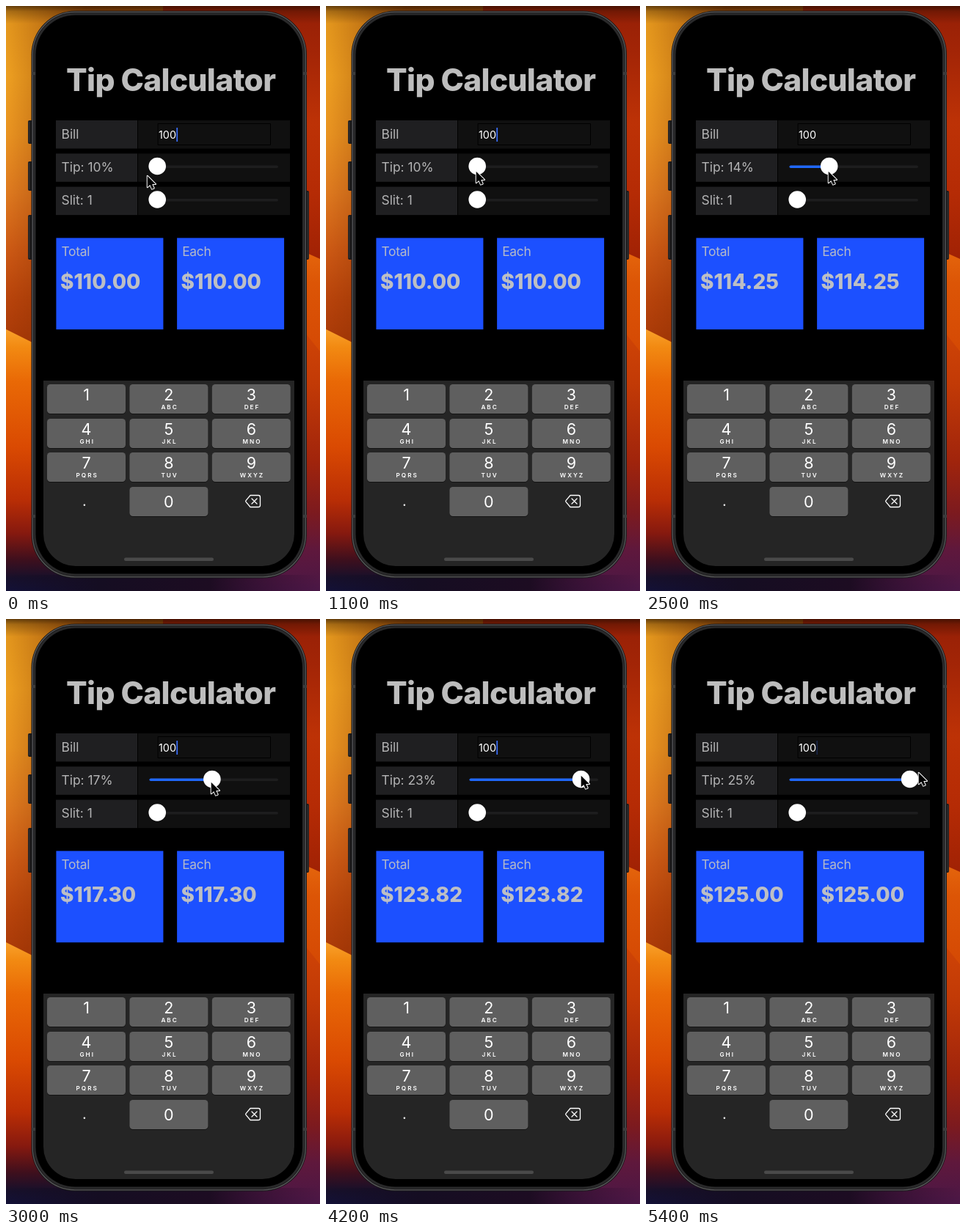
An HTML page with a canvas for the animation above (5500 ms loop, 428 by 798 pixels).

```html
<!DOCTYPE html>
<html lang="en">
<head>
<meta charset="utf-8">
<title>Tip Calculator</title>
<style>
  html, body { margin: 0; width: 100%; height: 100%; overflow: hidden; background: #000; }
  canvas { display: block; }
</style>
</head>
<body>
<canvas id="stage" width="428" height="798"></canvas>
<script>
const W = 428, H = 798, LOOP = 5500, STEP = 100;
const ctx = document.getElementById('stage').getContext('2d');

// [time, value] and [time, x, y]
const TIP = [[1300, 10], [1500, 10.35], [1800, 11.26], [2100, 12.4], [2500, 14.25],
  [3000, 17.3], [3500, 20.3], [4200, 23.82], [4500, 25]];
const POINTER = [[0, 192, 231], [200, 192, 231], [900, 204, 225], [1300, 204, 225],
  [1500, 208, 225], [1800, 217, 225], [2500, 248, 225], [3000, 279, 222], [3500, 310, 219],
  [4200, 347, 213], [4600, 364, 210], [4900, 371, 209]];

function at(keys, t, i = 1) {
  if (t <= keys[0][0]) return keys[0][i];
  for (let k = 1; k < keys.length; k++) {
    const a = keys[k - 1], b = keys[k];
    if (t <= b[0]) return a[i] + (b[i] - a[i]) * (t - a[0]) / (b[0] - a[0]);
  }
  return keys[keys.length - 1][i];
}

const clamp = v => Math.max(0, Math.min(1, v));

function rect(x, y, w, h, color, c = ctx) {
  c.fillStyle = color;
  c.fillRect(x, y, w, h);
}

function round(x, y, w, h, r, color, c = ctx) {
  c.fillStyle = color;
  c.beginPath();
  c.roundRect(x, y, w, h, r);
  c.fill();
}

function text(str, x, y, size, color, { weight = 400, align = 'left', spacing = 0, c = ctx } = {}) {
  c.font = `${weight} ${size}px Inter, "Liberation Sans", sans-serif`;
  c.textAlign = align;
  c.letterSpacing = spacing + 'px';
  c.fillStyle = color;
  c.fillText(str, x, y);
}

function gradient(c, x0, y0, x1, y1, stops) {
  const g = c.createLinearGradient(x0, y0, x1, y1);
  stops.forEach(([p, color]) => g.addColorStop(p, color));
  return g;
}

function polygon(c, points, color) {
  c.fillStyle = color;
  c.beginPath();
  points.forEach(([x, y]) => c.lineTo(x, y));
  c.closePath();
  c.fill();
}

function wallpaper(c) {
  // Left side: gold sheet above a brighter orange one
  rect(0, 0, 214, H, gradient(c, 0, 0, 0, H, [
    [0, '#e2951c'], [0.12, '#eea021'], [0.22, '#ea9421'], [0.32, '#df7a1f'],
    [0.42, '#cd5914'], [0.5, '#b9440b'], [0.58, '#a83807'], [1, '#a83807']]), c);
  rect(0, 0, 214, H, gradient(c, 0, 0, 110, 0, [
    [0, 'rgba(120,40,0,0)'], [1, 'rgba(120,40,0,.65)']]), c);
  polygon(c, [[0, 441], [40, 461], [214, 560], [214, H], [0, H]],
    gradient(c, 0, 440, 0, H, [
      [0, '#f9a22c'], [0.07, '#f28a12'], [0.2, '#e96906'], [0.45, '#da4a02'],
      [0.65, '#ba2e05'], [0.78, '#86190f'], [0.88, '#3f0f1d'], [0.95, '#17102b'], [1, '#131138']]));

  // Right side: dark red, orange, then red falling to purple
  rect(214, 0, 214, H, gradient(c, 0, 0, 0, H, [
    [0, '#951f06'], [0.08, '#a32506'], [0.2, '#bd3206'], [0.32, '#b52b05'], [0.45, '#9d2004'],
    [1, '#9d2004']]), c);
  polygon(c, [[390, 328], [428, 345], [428, H], [214, H], [214, 328]],
    gradient(c, 0, 335, 0, 480, [[0, '#e4650c'], [0.3, '#dc5506'], [1, '#d44804']]));
  polygon(c, [[390, 424], [428, 471], [428, H], [214, H], [214, 424]],
    gradient(c, 0, 445, 0, H, [
      [0, '#cf4406'], [0.2, '#c23a06'], [0.5, '#a0240c'], [0.7, '#7c1a1f'],
      [0.84, '#5f183c'], [1, '#4a1746']]));

  rect(0, 0, W, 24, gradient(c, 0, 0, 0, 24, [
    [0, 'rgba(20,8,0,.6)'], [0.3, 'rgba(20,8,0,.28)'], [1, 'rgba(20,8,0,0)']]), c);
  rect(0, 776, W, 22, gradient(c, 0, 0, W, 0, [
    [0, 'rgba(20,12,32,0)'], [0.3, '#150d22'], [0.65, '#1d0c22'], [1, 'rgba(50,14,50,0)']]), c);
}

function phone(c) {
  [[156, 32], [212, 40], [285, 61]].forEach(([y, h]) => {
    round(30, y, 7, h, 2, '#1c1b1c', c);
    rect(31, y + 2, 1, h - 4, '#3a3738', c);
  });
  round(407, 252, 6, 94, 2, '#1c1b1c', c);
  rect(411, 254, 1, 90, '#3a3738', c);

  round(34.5, 6.5, 375.5, 774, 60, '#171718', c);
  c.strokeStyle = '#59595b';
  c.lineWidth = 1.3;
  c.beginPath();
  c.roundRect(36.2, 8.2, 372.1, 770.6, 58);
  c.stroke();
  round(37.5, 9.5, 369.5, 768, 57, '#29292a', c);
  [90, 694].forEach(y => [35, 405].forEach(x => rect(x, y, 5, 4, '#3b3b3c', c)));
  round(40.5, 12.5, 363.5, 762, 54, '#000', c);
}

function keypad(c) {
  c.save();
  c.beginPath();
  c.roundRect(51, 23, 342, 741, 44);
  c.clip();
  rect(51, 511, 342, 253, '#252525', c);
  c.restore();

  const letters = ['', 'ABC', 'DEF', 'GHI', 'JKL', 'MNO', 'PQRS', 'TUV', 'WXYZ'];
  const key = (col, row) => {
    const x = 56 + col * 112.4, y = Math.round(516 + row * 46.7);
    round(x, y + 1, 107, 40, 4.5, '#141414', c);
    round(x, y, 107, 40, 4.5, '#5f5f5f', c);
    return [x + 53.5, y];
  };
  letters.forEach((label, i) => {
    const [x, y] = key(i % 3, Math.floor(i / 3));
    text(i + 1, x, y + 22, 21.5, '#fff', { align: 'center', c });
    text(label, x + 1.2, y + 34, 8.2, '#fff', { weight: 600, align: 'center', spacing: 2, c });
  });
  const [x, y] = key(1, 3);
  text('0', x, y + 27.5, 21.5, '#fff', { align: 'center', c });
  text('.', 107, 682, 20, '#fff', { align: 'center', c });

  c.strokeStyle = '#fff';
  c.lineWidth = 1.3;
  c.lineJoin = c.lineCap = 'round';
  c.stroke(new Path2D('M333 667.5H344Q346.5 667.5 346.5 670V681Q346.5 683.5 344 683.5H333' +
    'L327 676.3Q326.4 675.5 327 674.7ZM335 672l7 7M342 672l-7 7'));
  round(161, 752.5, 122, 4.5, 2.2, '#4a4a4a', c);
}

function form(c) {
  text('Tip Calculator', 82, 116, 42.4, '#bdbdbd', { weight: 800, spacing: -0.65, c });
  for (let i = 0; i < 3; i++) {
    const y = 156 + i * 45.3;
    rect(68, y, 111, 38.5, '#1f1f21', c);
    rect(180, y, 207, 38.5, '#101010', c);
  }
  c.strokeStyle = '#000';
  c.lineWidth = 1;
  c.strokeRect(207.5, 160.5, 153, 29);
  text('Bill', 75.5, 180.5, 17.4, '#b4b4b5', { c });
  text('Slit: 1', 75.5, 271, 17.4, '#b4b4b5', { c });
  text('100', 208, 181, 14.4, '#fff', { c });
  [[68, 'Total'], [232.7, 'Each']].forEach(([x, label]) => {
    rect(x + 0.4, 316.4, 146, 124.8, '#1c50ff', c);
    text(label, x + 7.5, 341, 17.4, '#b5bac8', { spacing: -0.3, c });
  });
}

function slider(y, x, filled) {
  round(195.5, y - 1, 175.5, 3.6, 1.8, '#1d1d1e');
  if (filled) round(195.5, y - 1, x - 195.5, 3.6, 1.8, '#2068fb');
  ctx.fillStyle = '#fff';
  ctx.beginPath();
  ctx.arc(x, y, 11.8, 0, 7);
  ctx.fill();
}

const arrow = new Path2D('M0 0V15.5L3.6 12.2L6.2 18L9 16.8L6.5 11.2H11.3Z');

function pointer(x, y) {
  ctx.save();
  ctx.translate(x + 0.7, y + 0.7);
  ctx.lineJoin = 'round';
  ctx.lineWidth = 2;
  ctx.strokeStyle = '#fff';
  ctx.stroke(arrow);
  ctx.fillStyle = '#000';
  ctx.fill(arrow);
  ctx.restore();
}

function caret(t) {
  const p = (t % 1000) / 1000;
  ctx.globalAlpha = p < 0.55 ? clamp((0.44 - p) / 0.16) : clamp((p - 0.57) / 0.14);
  rect(232.3, 166, 1.8, 19, '#3a6cf2');
  ctx.globalAlpha = 1;
}

const backdrop = document.createElement('canvas');
backdrop.width = W;
backdrop.height = H;
const back = backdrop.getContext('2d');
[wallpaper, phone, keypad, form].forEach(draw => draw(back));

function frame(now) {
  const t = Math.floor(now % LOOP / STEP) * STEP;
  const tip = at(TIP, t);
  const total = '$' + (100 + tip).toFixed(2);

  ctx.drawImage(backdrop, 0, 0);
  caret(t);
  text(`Tip: ${Math.floor(tip)}%`, 75.5, 225.8, 17.4, '#b4b4b5');
  slider(218.5, 206.2 + (tip - 10) * 10.23, tip > 10);
  slider(264, 206.2, false);
  [74, 238.5].forEach(x => text(total, x, 385.6, 28, '#bdbfc5', { weight: 800 }));
  pointer(at(POINTER, t), at(POINTER, t, 2));
  requestAnimationFrame(frame);
}

requestAnimationFrame(frame);
</script>
</body>
</html>
```
